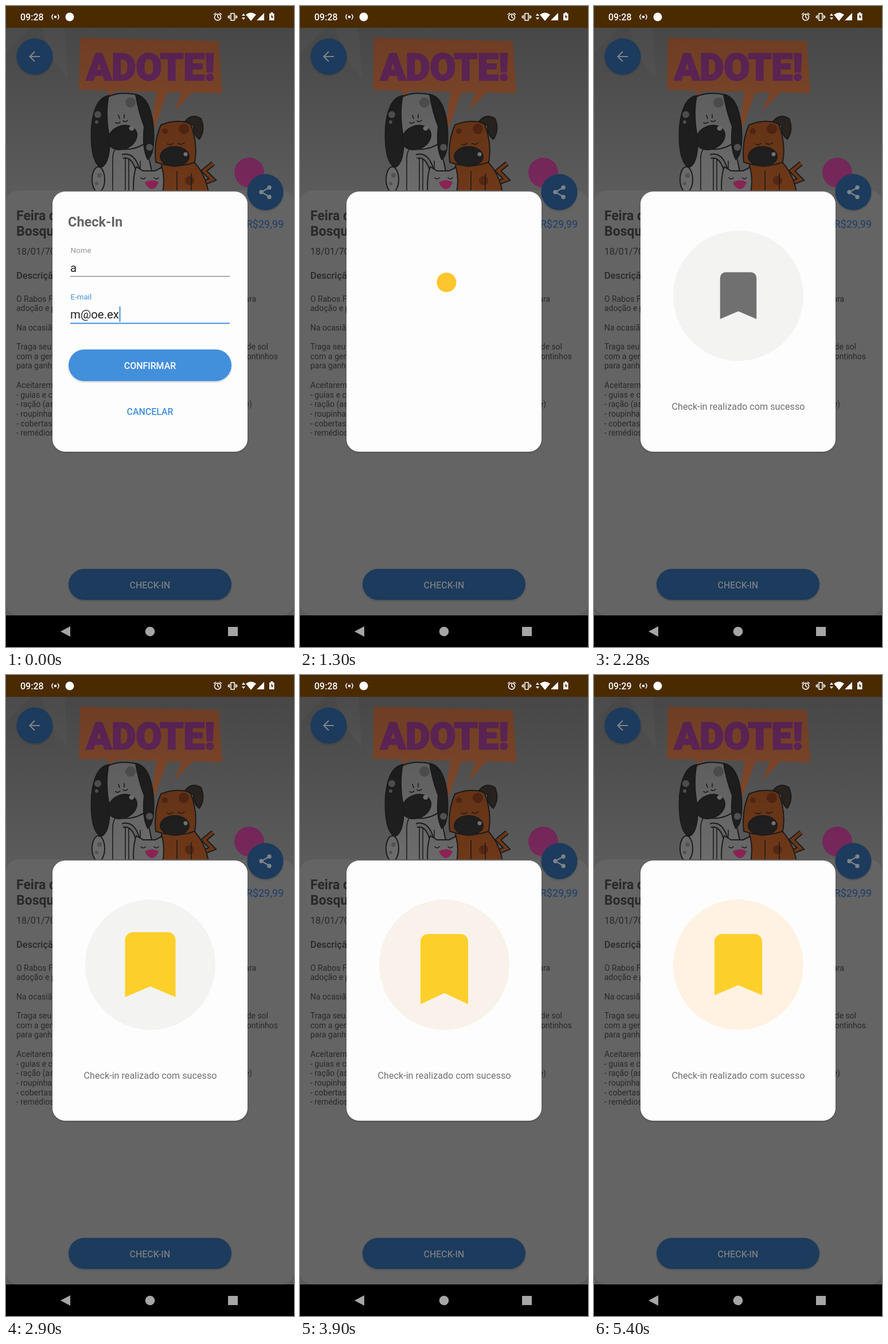
An HTML page that plays this animation: 502x1116 px, repeating every 5440 ms.

```html
<!DOCTYPE html>
<html lang="pt-BR">
<head>
<meta charset="utf-8">
<title>Check-In</title>
<style>
  html, body { margin: 0; height: 100%; overflow: hidden; background: #000; }
  svg { display: block; width: 100vw; height: 100vh; font-family: Roboto, sans-serif; }
  .body { font-size: 14px; fill: #292929; }
  .btn { font-size: 15.9px; font-weight: 500; text-anchor: middle; }
  .head { font-size: 23px; font-weight: 700; }
  .label { font-size: 13.4px; }
  .input { font-size: 20.4px; fill: #222; }
  .ink { stroke: #1d1d1d; stroke-width: 2; }
  .line { fill: none; stroke: #1d1d1d; stroke-width: 1.6; stroke-linecap: round; }
</style>
</head>
<body>
<svg viewBox="0 0 502 1116" preserveAspectRatio="none">
  <defs>
    <filter id="shade" x="-20%" y="-20%" width="140%" height="150%">
      <feDropShadow dx="0" dy="1.500" stdDeviation="1.500" flood-opacity=".22"/>
    </filter>
    <clipPath id="pill"><rect x="109" y="598" width="284" height="55" rx="27.5"/></clipPath>
    <linearGradient id="scrim" x2="0" y2="1">
      <stop stop-opacity=".22"/><stop offset="1" stop-opacity="0"/>
    </linearGradient>
  </defs>

  <!-- Banner -->
  <rect width="502" height="1116" fill="#5b5b5b"/>
  <path d="M0 38H44L0 82ZM60 38H102L108 126L86 100Z" fill="#606060"/>
  <path d="M129 55L371 61L377 152L325 150L294 183L306 150L281 151L250 236L262 149L186 148L192 169L176 147L127 146Z" fill="#8a4d2d"/>
  <text x="252" y="129" font-size="65" font-weight="900" text-anchor="middle" fill="#6b2a63" stroke="#6b2a63" stroke-width="2.500">ADOTE!</text>

  <!-- White dog -->
  <g class="ink" fill="#6c6c6c">
    <path d="M176 240Q160 280 160 330H256Q258 280 240 240Z"/>
    <ellipse cx="161" cy="302" rx="11" ry="22"/>
    <path class="line" d="M186 322V266Q186 256 190 250M208 322V262M214 322V266M234 322V270"/>
    <path d="M178 158Q200 148 230 155Q246 160 246 236Q220 258 182 244Q170 200 178 158Z"/>
    <path d="M179 156Q154 160 149 210Q146 270 165 281Q181 276 181 232Q172 190 179 156ZM226 154Q252 158 257 212Q260 258 247 267Q237 248 241 210Q231 184 226 154Z" fill="#202020"/>
    <ellipse cx="203" cy="229" rx="26" ry="20" fill="#202020" transform="rotate(-25 203 229)"/>
  </g>
  <g fill="#555">
    <circle cx="217" cy="168" r="9"/>
    <circle cx="160" cy="189" r="6"/><circle cx="158" cy="202" r="3"/><circle cx="250" cy="246" r="6"/>
    <circle cx="163" cy="295" r="4"/><circle cx="158" cy="309" r="3"/>
  </g>
  <ellipse cx="219" cy="213" rx="4.500" ry="4" fill="#777"/>
  <path class="line" d="M191 203Q195 206 199 202M204 200Q208 203 212 199M196 190L198 196M206 189L206 195"/>

  <!-- Brown dog -->
  <path d="M342 309L360 302L345 287L361 274" fill="none" stroke="#1d1d1d" stroke-width="9"/>
  <path d="M342 309L360 302L345 287L361 274" fill="none" stroke="#6e3818" stroke-width="5"/>
  <g class="ink" fill="#6e3818">
    <path d="M274 270Q262 300 268 330H354Q348 290 324 268Z"/>
    <path d="M270 207Q296 196 321 204Q335 238 329 272Q296 284 261 272Q257 236 270 207Z"/>
    <path d="M312 201Q324 186 340 196Q348 216 337 232Q326 224 327 208Z" fill="#2b2522"/>
    <ellipse cx="294" cy="262" rx="25" ry="17" fill="#202020"/>
  </g>
  <g fill="#562713">
    <circle cx="310" cy="214" r="9"/><circle cx="277" cy="218" r="5"/><circle cx="320" cy="304" r="8"/>
  </g>
  <circle cx="313" cy="258" r="3.500" fill="#777"/>
  <path class="line" d="M281 240Q286 244 291 239M300 239Q306 243 311 238M298 322V288M323 322V292"/>

  <!-- Cat -->
  <path d="M203 262Q222 257 230 287" fill="none" stroke="#1d1d1d" stroke-width="9"/>
  <path d="M203 262Q222 257 230 287" fill="none" stroke="#666" stroke-width="5"/>
  <path class="ink" d="M223 330Q220 300 227 280L239 287H260L272 281Q278 304 272 330Z" fill="#696969"/>
  <path d="M242 307Q255 300 266 307Q262 318 254 319Q246 317 242 307Z" fill="#8b2353"/>
  <path class="line" d="M235 299Q239 303 243 299M258 299Q262 303 266 299"/>

  <circle cx="424" cy="290" r="26" fill="#78285c"/>
  <rect y="38" width="502" height="283" fill="url(#scrim)"/>

  <!-- Sheet -->
  <rect y="321" width="502" height="740" rx="22" fill="#646464"/>
  <g id="copy"></g>
  <g fill="#1a3b5d" filter="url(#shade)">
    <circle cx="50" cy="88" r="31.500"/>
    <circle cx="452" cy="324" r="31.500"/>
    <rect x="109" y="980" width="284" height="54" rx="27"/>
  </g>
  <path d="M59 88H42M50 79.500L41.500 88L50 96.500" fill="none" stroke="#7e8388" stroke-width="2.200"/>
  <g fill="#7e8388">
    <path d="M459 316L445 324L459 332" fill="none" stroke="#7e8388" stroke-width="2.200"/>
    <circle cx="459" cy="316" r="3.700"/><circle cx="445" cy="324" r="3.700"/><circle cx="459" cy="332.500" r="3.700"/>
    <text class="btn" x="251" y="1013.500" fill="#777b80">CHECK-IN</text>
  </g>

  <!-- System bars -->
  <rect width="502" height="38" fill="#4a2b00"/>
  <rect y="1061" width="502" height="55" fill="#000"/>
  <path d="M95 1089L112 1080V1098ZM387 1081H404V1097H387Z" fill="#a6a6a6"/>
  <circle cx="251" cy="1089" r="8.300" fill="#a6a6a6"/>
  <g fill="#fff">
    <text id="clock" x="25" y="25" font-size="16" font-weight="500"></text>
    <circle cx="86" cy="19" r="2.300"/>
    <circle cx="111" cy="19" r="7.500"/>
    <path d="M411 17L414 13L417 17ZM411 20H417L414 24ZM418 15Q427 8 436 15L427 26ZM437 25L450 12V25ZM459 13H461.500V11H465V13H467.500V25H459Z"/>
    <path d="M464 14L461.500 19.500H463.500V23L466 18H464Z" fill="#4a2b00"/>
  </g>
  <g fill="none" stroke="#fff" stroke-width="1.500">
    <path d="M82 14.500Q78 19 82 23.500M90 14.500Q94 19 90 23.500M369 15V19.500L372 21.500M362 15L366 12M376 15L372 12M392 13H398V25H392ZM389.500 15.500V22.500M400.500 15.500V22.500M387.500 17V21M402.500 17V21"/>
    <circle cx="369" cy="19.500" r="5.500"/>
  </g>

  <!-- Dialog -->
  <rect x="81" y="323" width="340" height="453" rx="22" fill="#fdfdfd" filter="url(#shade)"/>
  <g id="form">
    <text class="head" x="108" y="384" fill="#666" style="font-size:23.500px">Check-In</text>
    <text class="label" x="112.500" y="430" fill="#979797">Nome</text>
    <text class="input" x="112" y="462.500">a</text>
    <rect x="112" y="470" width="278" height="1.200" fill="#777"/>
    <text class="label" x="112.500" y="511" fill="#428fdc">E-mail</text>
    <text class="input" x="112" y="544">m@oe.ex</text>
    <rect id="caret" x="197.500" y="523" width="2" height="27" fill="#428fdc"/>
    <rect x="112" y="551.500" width="278" height="2" fill="#428fdc"/>
    <rect x="109" y="598" width="284" height="55" rx="27.500" fill="#428fdc" filter="url(#shade)"/>
    <circle id="ripple" cx="251" cy="626" fill="#fff" clip-path="url(#pill)"/>
    <text class="btn" x="251" y="632" fill="#fff">CONFIRMAR</text>
    <text class="btn" x="251" y="712" fill="#428fdc">CANCELAR</text>
  </g>
  <circle id="dot" r="17" fill="#fdc62e"/>
  <g id="done">
    <circle id="disc" cx="251.500" cy="504.500" r="113.500"/>
    <path id="mark"/>
    <text x="251.500" y="703" font-size="16.200" text-anchor="middle" fill="#707070">Check-in realizado com sucesso</text>
  </g>
</svg>
<script>
const $ = id => document.getElementById(id);
const set = (id, attrs) => { for (const k in attrs) $(id).setAttribute(k, attrs[k]); };
const show = (id, on) => set(id, { visibility: on ? 'visible' : 'hidden' });
const span = (t, a, b) => Math.min(1, Math.max(0, (t - a) / (b - a)));
const ease = u => u * u * (3 - 2 * u);
const back = u => 1 + 2.3 * (u - 1) ** 3 + 1.3 * (u - 1) ** 2;
const mix = (a, b, u) => a.map((v, i) => Math.round(v + (b[i] - v) * u));

// Page text: left column, then line ends visible right of the dialog
const write = (x, y, text, attrs = 'class="body"') =>
  `<text x="${x}" y="${y}" ${attrs}>${text}</text>`;
const end = 'class="body" text-anchor="end"';
const rows = ['O Rabos F', 'adoção e p', '', 'Na ocasiã', '', 'Traga seu', 'com a gen', 'para ganh', '',
  'Aceitarem', '- guias e c', '- ração (as', '- roupinha', '- cobertas', '- remédios'];
$('copy').innerHTML =
  write(18, 373, 'Feira d', 'class="head" fill="#292929"') +
  write(18, 400, 'Bosqu', 'class="head" fill="#292929"') +
  write(18, 433, '18/01/70', 'font-size="16.2" fill="#292929"') +
  write(18, 475, 'Descriçã', 'font-size="16.4" font-weight="500" fill="#292929"') +
  write(484, 386, 'R$29,99', 'font-size="18" text-anchor="end" fill="#1b3f6b"') +
  rows.map((s, i) => write(18, 514.5 + i * 16.7, s)).join('') +
  write(436, 514.5, 'ara', end) + write(457, 598, 'de sol', end) +
  write(474, 614.7, 'ontinhos', end) + write(429, 698.2, 'e)', end);

function render(t) {
  $('clock').textContent = t < 5400 ? '09:28' : '09:29';
  show('form', t < 1180);
  show('dot', t >= 1180 && t < 1720);
  show('done', t >= 1720);

  // Caret blink and button press
  set('caret', { opacity: t < 120 || t >= 600 ? 1 : 0 });
  const press = span(t, 850, 1150);
  set('ripple', { r: 150 * press, opacity: 0.25 * (1 - press) });

  // Loader dot circling the dialog centre
  const angle = 2 * Math.PI * ease(span(t, 1270, 1790));
  set('dot', { cx: 251 + 68 * Math.sin(angle), cy: 549 - 68 * Math.cos(angle) });

  // Bookmark: grey shrinks, yellow pops in, then its tail stretches and recoils
  const filled = t >= 2580;
  const scale = filled ? back(span(t, 2580, 3080)) : 1 - span(t, 2000, 2580) ** 2;
  const pull = ease(span(t, 3100, 3560)) - ease(span(t, 3560, 4240));
  const low = 557.5 + 31.5 * pull;
  set('mark', {
    d: `M210 ${low}V464A13 13 0 0 1 223 451H280A13 13 0 0 1 293 464V${low}L251.5 ${low - 17.5 - 4 * pull}Z`,
    fill: filled ? '#fdcf2a' : '#707070',
    transform: `translate(251.5 504) scale(${Math.max(0, scale)}) translate(-251.5 -504)`
  });
  set('disc', { fill: `rgb(${mix([243, 243, 242], [255, 242, 226], span(t, 3450, 4340))})` });
}

const start = performance.now();
(function tick() {
  render((performance.now() - start) % 5440);
  requestAnimationFrame(tick);
})();
</script>
</body>
</html>
```
